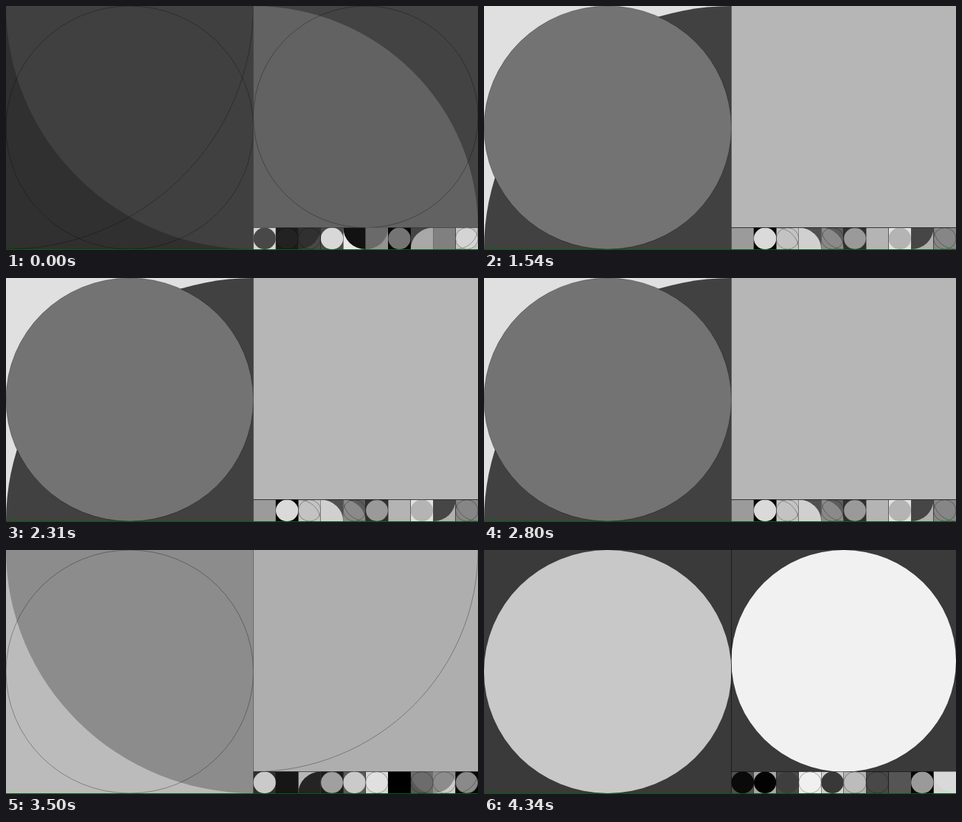
An HTML page with a canvas for the animation above (5.6 s loop, 640 by 333 pixels).

```html
<!DOCTYPE html>
<html lang="en">
<head>
<meta charset="utf-8">
<title>Grey tiles</title>
<style>
html, body { margin: 0; width: 100%; height: 100%; overflow: hidden; background: #000; }
canvas { display: block; }
</style>
</head>
<body>
<canvas id="stage" width="640" height="333"></canvas>
<script>
const ctx = document.getElementById('stage').getContext('2d');
const LOOP = 5600;
const SPLIT = 335.4, SHELF = 302.6, FLOOR = 332;

// Each tile: background grey, then shapes in paint order.
// o = inscribed ellipse, tl/tr/bl/br = quarter ellipse centred on that corner.
// A grey after the shape fills it; without one it is a hairline.
const scenes = [
  { from: 0, left: '30 tr40 tl o', right: '43 bl62 o', row: [
    'd6 o48', '1c o22 o', '48 tl30 o', '4a od8', 'e8 tr12',
    '92 tl6a', '06 o74', '44 bra8', '80', 'c4 od4 o tl'] },
  { from: 1260, left: 'e0 br41 o73 o', right: 'b6', seam: true, row: [
    '9b', '08 oda', 'c3 o bl', '50 bld0', '5c bl8a o tr',
    '30 o9a o', 'b4', 'e2 ob4', 'b0 tl46', '86 o tr'] },
  { from: 2870, left: 'bb tr8c o', right: 'ae tl', row: [
    '30 oca', '16', 'b6 br24', '1c oa0 o', '5a oca',
    'd8 oe0 o', '00', '58 tr6c o', 'cc tl8c o', '08 o8a o tl'] },
  { from: 4340, left: '3a oc8', right: '3a of1', row: [
    '50 o0a o', 'a8 o02', '4a o3e', 'ea of0 o', 'd0 o38',
    'b4 obc o', '48 o', '55', '04 o9a', 'd4 trd9'] }
];

const grey = h => '#' + h + h + h;

function tile(spec, x, y, w, h) {
  const [base, ...shapes] = spec.split(' ');
  ctx.save();
  ctx.beginPath();
  ctx.rect(x, y, w, h);
  ctx.clip();
  ctx.fillStyle = grey(base);
  ctx.fillRect(x, y, w, h);
  for (const shape of shapes) {
    const [, kind, tone] = shape.match(/^(o|[tb][lr])(\w*)$/);
    ctx.beginPath();
    if (kind === 'o') {
      ctx.ellipse(x + w / 2, y + h / 2, w / 2, h / 2, 0, 0, Math.PI * 2);
    } else {
      const cx = kind[1] === 'l' ? x : x + w;
      const cy = kind[0] === 't' ? y : y + h;
      ctx.ellipse(cx, cy, w, h, 0, 0, Math.PI * 2);
    }
    if (tone) {
      ctx.fillStyle = grey(tone);
      ctx.fill();
    } else {
      ctx.lineWidth = 0.8;
      ctx.strokeStyle = 'rgba(0,0,0,0.4)';
      ctx.stroke();
    }
  }
  ctx.restore();
}

function draw(scene) {
  const side = 640 - SPLIT, step = side / scene.row.length;
  ctx.clearRect(0, 0, 640, 333);
  tile(scene.left, 0, 0, SPLIT, FLOOR);
  tile(scene.right, SPLIT, 0, side, SHELF);
  scene.row.forEach((spec, i) => tile(spec, SPLIT + i * step, SHELF, step, FLOOR - SHELF));
  if (scene.seam) {
    ctx.fillStyle = 'rgba(0,0,0,0.35)';
    ctx.fillRect(SPLIT, 302, side, 1);
  }
  ctx.fillStyle = '#006400';
  ctx.fillRect(0, FLOOR, 640, 1);
}

const start = performance.now();
let shown;
function tick() {
  const t = (performance.now() - start) % LOOP;
  const scene = scenes.findLast(s => s.from <= t);
  if (scene !== shown) draw(shown = scene);
  requestAnimationFrame(tick);
}
tick();
</script>
</body>
</html>
```
